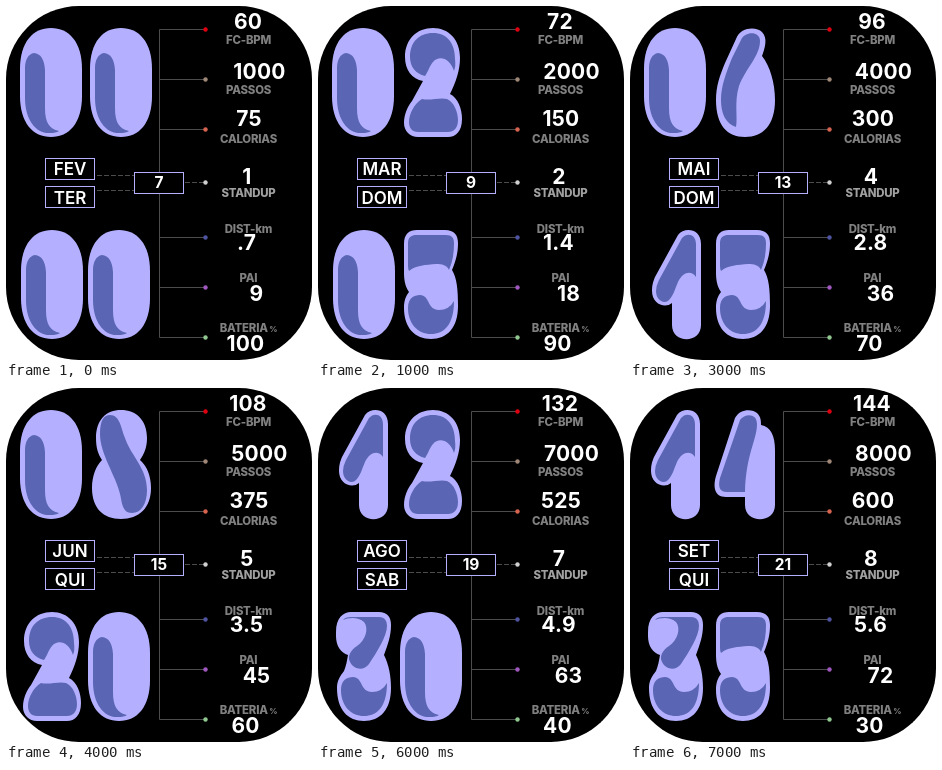
Animation of 306x354 px, one loop 8000 ms. Source, as an HTML page:

```html
<!DOCTYPE html>
<html lang="pt">
<head>
<meta charset="utf-8">
<style>
html, body { margin: 0; width: 100%; height: 100%; overflow: hidden; background: #fff; }
svg { display: block; width: 306px; height: 354px; }
text { font-family: Inter, "Liberation Sans", sans-serif; text-anchor: middle; fill: #fff; }
.label { font-size: 11.4px; font-weight: 800; fill: #808080; letter-spacing: -.2px; }
.value { font-size: 21px; font-weight: 700; letter-spacing: .2px; }
.box { font-size: 17px; font-weight: 600; }
.day { font-size: 15.5px; font-weight: 700; }
.light { fill: #b4b0ff; }
.dark { fill: #5a66b4; }
.frame { fill: #000; stroke: #b4b0ff; }
.wire { fill: none; stroke: #4c4c4c; }
.dash { stroke-dasharray: 5 2; }
</style>
</head>
<body>
<svg viewBox="0 0 306 354">
  <rect width="306" height="354" rx="73"/>
  <path class="wire" d="M199 23.5H153.5V331.5H199M153.5 73.5H199M153.5 123.5H199M153.5 231.5H199M153.5 281.5H199"/>
  <path class="wire dash" d="M91 169.5H128M91 184.5H128M179 176.5H198"/>
  <rect class="frame" x="39.5" y="152.5" width="49" height="21"/>
  <rect class="frame" x="39.5" y="180.5" width="49" height="21"/>
  <rect class="frame" x="128.5" y="166.5" width="49" height="21"/>
  <g id="fixed"></g>
  <g id="live"></g>
</svg>
<script>
// Inner shade shared by the lower bowls of 3 and 5
const BOWL = 'M8 78C8 68 14 65 20 65C30 65 27 80 39 80Q49 80 54 71C54 95 44 104 31 104S8 94 8 78Z';

// Each digit: [outer shape, inner shade]
const DIGITS = {
  0: ['M0 41C0 14 13 0 31 0S62 14 62 41V68C62 95 49 109 31 109S0 95 0 68Z',
      'M5 40C5 32 8 26 14 25Q24 26 25 42V80C25 94 29 101 39 103Q36 105 30 105C17 106 5 93 5 70Z'],
  1: ['M33 5C39-3 56-2 56 14V95C56 114 27 114 27 95V73C20 79 7 74 7 61C7 55 8 52 10 47Z',
      'M37 8C42 2 51 4 51 14V47C46 40 38 42 33 52C30 59 28 67 23 71C17 74 11 69 11 61Q11 56 14 50Z'],
  2: ['M3 29C3 11 15 0 31 0S58 12 58 30C58 42 54 54 48 66C56 70 60 81 60 91C60 103 54 109 46 109H16C8 109 2 103 2 95C2 86 6 78 10 73L21 53C10 51 3 42 3 29Z',
      'M8 29C8 14 17 5 31 5S53 15 53 31Q54 38 52 43C48 30 37 27 31 34C27 39 26 44 23 48C14 46 8 39 8 29ZM20 71C28 73 38 69 45 71C52 74 56 84 56 92C56 100 52 104 46 104H16C10 104 7 100 7 94C7 86 12 76 20 71Z'],
  3: ['M3 20C3 6 10 0 18 0H46C54 0 58 5 58 13C58 24 55 32 51 43C56 53 58 64 58 76C58 98 47 109 31 109S4 98 4 76C4 69 7 64 11 59C13 54 14 49 15 43C8 41 3 34 3 24Z',
      'M10 8Q12 5 18 5H46C52 5 54 9 54 14C54 24 44 40 36 52C31 59 21 58 17 50C14 44 18 38 24 34C33 28 36 16 31 10C26 5 16 5 10 8Z' + BOWL],
  4: ['M21 8C26-2 39-1 43 3C47 7 47 11 47 15C57 17 61 26 61 40V95C61 114 31 114 31 95V87H12C0 87-1 76 2 66Z',
      'M26 10C31 3 43 3 43 14C43 30 32 44 31 82H13C5 82 4 76 6 68Z'],
  5: ['M4 14C4 4 9 0 17 0H45C54 0 58 5 58 13C58 23 56 30 52 40C57 48 58 60 58 76C58 98 47 109 31 109S4 98 4 78C4 70 6 66 9 62C5 56 4 50 4 42Z',
      'M8 13C8 7 12 5 16 5H46C52 5 54 8 54 13C54 22 53 31 49 40C47 35 42 34 36 34C26 35 16 35 9 41Q8 39 8 36Z' + BOWL],
  6: ['M22 11C27-2 43-1 48 4C54 10 51 20 48 28C56 38 61 55 61 72C61 97 49 109 31 109S2 97 2 72C2 58 6 47 11 35Z',
      'M27 12C31 3 46 3 46 13C46 28 32 40 25 58C20 74 24 90 22 99C12 96 7 86 7 72C7 58 12 45 18 30Z'],
  8: ['M6 28C6 10 16 0 31 0S57 10 57 28C57 38 54 44 50 50C57 56 61 66 61 78C61 98 49 109 31 109S2 98 2 78C2 66 6 56 12 50C8 44 6 38 6 28Z',
      'M10 24C10 10 14 5 20 5C30 5 31 18 35 28C41 46 57 58 57 80C57 94 51 103 42 103C32 103 32 92 30 84C26 66 10 44 10 24Z']
};
const MONTHS = ['FEV', 'MAR', 'ABR', 'MAI', 'JUN', 'JUL', 'AGO', 'SET'];
const DAYS = ['TER', 'DOM', 'TER', 'DOM', 'QUI', 'TER', 'SAB', 'QUI'];

// [label, label baseline, dot y, dot colour, value x, value baseline, value at step n]
const METRICS = [
  ['FC-BPM', 37.5, 23.5, '#e00010', 242, 23.2, n => 48 + 12 * n],
  ['PASSOS', 87.5, 73.5, '#a08878', 253.5, 73, n => 1000 * n],
  ['CALORIAS', 136.5, 123.5, '#d86450', 243, 120.2, n => 75 * n],
  ['<tspan fill="#a0a0a0">STANDUP</tspan>', 190.5, 176.5, '#d0d0d0', 241, 177.5, n => n],
  ['DIST-km', 226.5, 231.5, '#5054a0', 240.5, 244.3, n => (.7 * n).toFixed(1).replace(/^0/, '')],
  ['PAI', 276, 281.5, '#a058c0', 250.5, 294.7, n => 9 * n],
  ['BATERIA<tspan font-size="8"> %</tspan>', 326, 331.5, '#90c890', 239.5, 345, n => 110 - 10 * n]
];

const text = (kind, x, y, s) => `<text class="${kind}" x="${x}" y="${y}">${s}</text>`;
const digit = (d, x, y) => `<g transform="translate(${x} ${y})">` +
  `<path class="light" d="${DIGITS[d][0]}"/><path class="dark" d="${DIGITS[d][1]}"/></g>`;
const pair = (n, x1, x2, y) => {
  const [a, b] = String(n).padStart(2, '0');
  return digit(a, x1, y) + digit(b, x2, y);
};

const fixed = document.getElementById('fixed');
const live = document.getElementById('live');

fixed.innerHTML = METRICS.map(([label, y, dotY, colour]) =>
  `<circle cx="199.5" cy="${dotY}" r="2.2" fill="${colour}"/>` + text('label', 242.5, y, label)).join('');

let shown = -1;
function draw() {
  const step = Math.floor(performance.now() % 8000 / 1000);
  if (step !== shown) {
    shown = step;
    live.innerHTML = pair(2 * step, 14, 84, 22) + pair(5 * step, 15, 82, 224) +
      text('box', 64, 169, MONTHS[step]) +
      text('box', 64, 198, DAYS[step]) +
      text('day', 153, 182, 7 + 2 * step) +
      METRICS.map(([, , , , x, y, value]) => text('value', x, y, value(step + 1))).join('');
  }
  requestAnimationFrame(draw);
}
draw();
</script>
</body>
</html>
```
